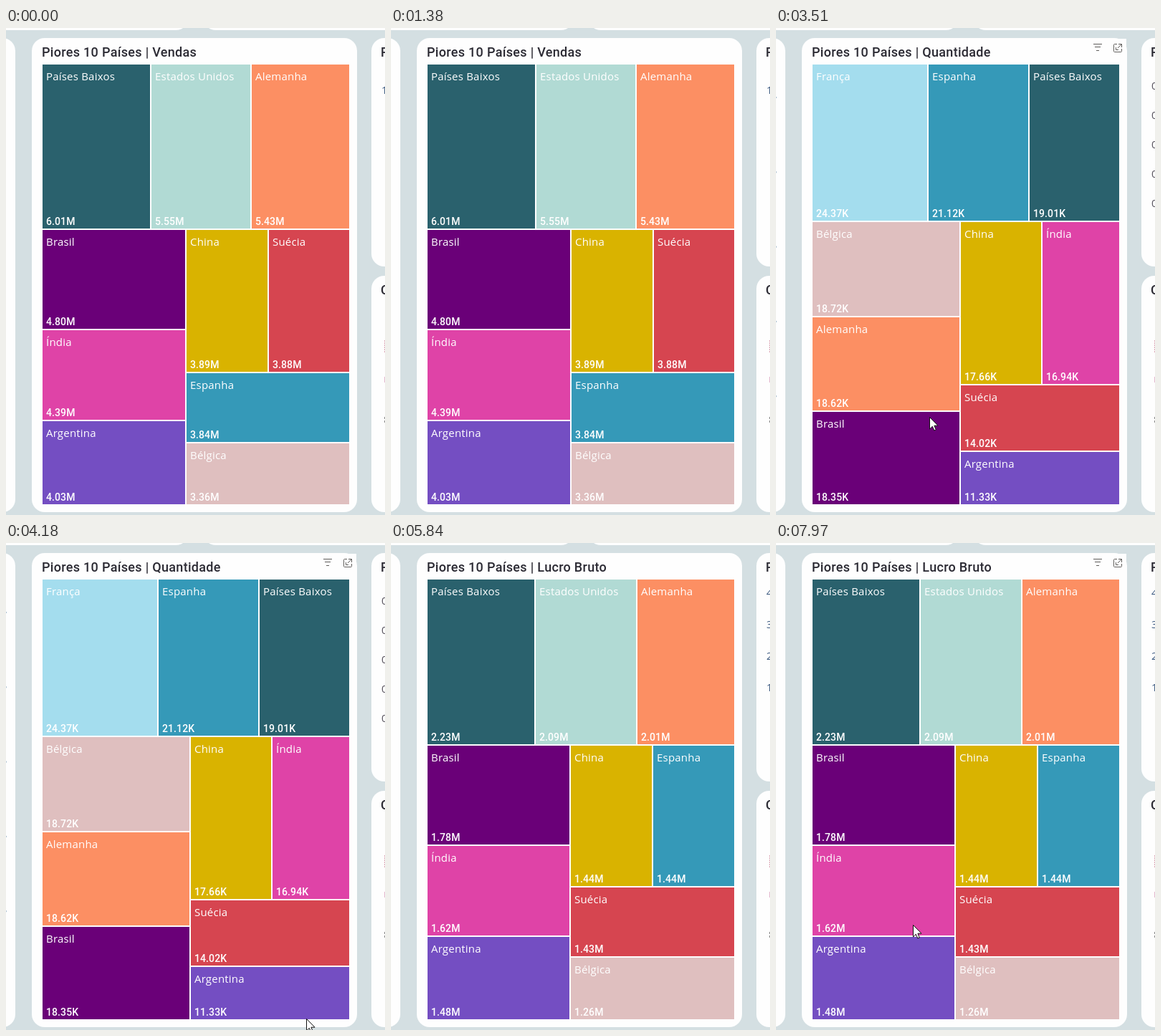
Write an HTML page that moves like this. It is 529 by 680 pixels and loops after 8 s.

```html
<!DOCTYPE html>
<html lang="pt">
<head>
<meta charset="utf-8">
<title>Piores 10 Países</title>
<style>
  html, body { margin: 0; width: 100%; height: 100%; overflow: hidden; background: #d4dfe2; }
  svg { display: block; }
  .panel { fill: #fefefe; }
  .title { font: 500 18px Roboto, sans-serif; letter-spacing: .3px; fill: #2b2a33; }
  .name { font: 15px "Open Sans", sans-serif; letter-spacing: .2px; fill: #fff; }
  .value { font: 500 14px Roboto, sans-serif; letter-spacing: .1px; fill: #fff; }
  .axis { font: 15px "Open Sans", sans-serif; }
</style>
</head>
<body>
<svg width="529" height="680" viewBox="0 0 529 680">
  <g class="panel">
    <rect x="-40" y="-40" width="295" height="43" rx="18"/>
    <rect x="275" y="-40" width="300" height="43" rx="18"/>
    <rect x="-60" y="14" width="73" height="662" rx="18"/>
    <rect x="36" y="14" width="454" height="662" rx="18"/>
    <rect x="510" y="14" width="80" height="319" rx="18"/>
    <rect x="510" y="346" width="80" height="330" rx="18"/>
  </g>
  <text class="title" x="523" y="40">P</text>
  <text class="title" x="523" y="372">C</text>
  <path d="M528.5 436v18" stroke="#dba5b5" stroke-width="1" stroke-dasharray="2 1"/>
  <path d="M528.5 487v8" stroke="#e3b9cf"/>
  <path d="M528.5 543v9" stroke="#8b8b8b" stroke-dasharray="3 2"/>
  <g id="chart"></g>
  <g id="header" fill="none" stroke="#605e5c">
    <rect x="430" y="15" width="59" height="26" fill="#fefefe" stroke="none"/>
    <path d="M443 22.5h12M445 26.5h8M447 31.5h4"/>
    <path d="M476 22.5h-3.5a1 1 0 0 0-1 1v9a1 1 0 0 0 1 1h9a1 1 0 0 0 1-1V29M478 22.5h4.5V27M482 23l-5 5M474.5 27v3.5H478"/>
  </g>
  <path id="cursor" d="M.5 .5V17L4.3 13.3 6.8 19 9.3 18 6.9 12.2H12Z" fill="#fff" stroke="#111"/>
</svg>
<script>
const LOOP = 8000, STEP = 1000 / 15;
const $ = id => document.getElementById(id);

const colors = {
  'Países Baixos': '#2a616d', 'Estados Unidos': '#b1dad4', 'Alemanha': '#fc8f63',
  'Brasil': '#6a0078', 'Índia': '#df43a7', 'Argentina': '#744ec2', 'China': '#d9b300',
  'Suécia': '#d64550', 'Espanha': '#3599b8', 'Bélgica': '#dfbfbf', 'França': '#a4ddee'
};

// cuts: two in the top row, its bottom, then the column split and the splits on each side
const views = [
  { start: 0, title: 'Vendas', unit: 'M', cuts: [202, 342, 281, 251, 421, 548, 366, 481, 579],
    names: 'Países Baixos,Estados Unidos,Alemanha,Brasil,Índia,Argentina,China,Suécia,Espanha,Bélgica',
    values: '6.01,5.55,5.43,4.80,4.39,4.03,3.89,3.88,3.84,3.36',
    axis: { labels: '1', top: 87, gap: 0, color: '#3c5a80' } },
  { start: 2840, title: 'Quantidade', unit: 'K', cuts: [212, 353, 270, 257, 403, 535, 371, 498, 591],
    names: 'França,Espanha,Países Baixos,Bélgica,Alemanha,Brasil,China,Índia,Suécia,Argentina',
    values: '24.37,21.12,19.01,18.72,18.62,18.35,17.66,16.94,14.02,11.33',
    axis: { labels: '00000', top: 81, gap: 41, color: '#5a5660' }, ticks: true },
  { start: 5840, title: 'Lucro Bruto', unit: 'M', cuts: [201, 343, 282, 250, 422, 549, 365, 480, 578],
    names: 'Países Baixos,Estados Unidos,Alemanha,Brasil,Índia,Argentina,China,Espanha,Suécia,Bélgica',
    values: '2.23,2.09,2.01,1.78,1.62,1.48,1.44,1.44,1.43,1.26',
    axis: { labels: '4321', top: 70, gap: 44, color: '#3c5a80' } }
];

// cursor visits: [time, x, y]
const visits = [
  [[445, 437, 672], [711, 187, 303], [850, 187, 303], [1370, 0, 45]],
  [[2900, 0, 60], [3040, 154, 421], [3200, 154, 421], [3500, 210, 541], [3700, 272, 568],
   [4045, 245, 676], [4178, 419, 664], [4400, 358, 580], [4650, 272, 568], [4910, 200, 556], [5170, 250, 20]],
  [[5900, 250, 30], [6110, 204, 536], [6270, 204, 536], [6570, 84, 468], [6800, 84, 468],
   [7040, 9, 520], [7240, 60, 690], [7440, 470, 690], [7640, 477, 643], [7978, 191, 533], [LOOP, 191, 533]]
];

function cells([a, b, y, m, l1, l2, r, r1, r2]) {
  const L = 50, T = 50, R = 480, B = 666;
  return [
    [L, T, a, y], [a, T, b, y], [b, T, R, y],
    [L, y, m, l1], [L, l1, m, l2], [L, l2, m, B],
    [m, y, r, r1], [r, y, R, r1], [m, r1, R, r2], [m, r2, R, B]
  ];
}

const text = (cls, x, y, s, fill) =>
  `<text class="${cls}" x="${x}" y="${y}"${fill ? ` fill="${fill}"` : ''}>${s}</text>`;

function drawChart({ title, unit, cuts, names, values, axis, ticks }) {
  const name = names.split(','), value = values.split(',');
  let out = text('title', 50, 40, 'Piores 10 Países | ' + title);
  cells(cuts).forEach(([x0, y0, x1, y1], i) => {
    out += `<rect x="${x0 + 1}" y="${y0 + 1}" width="${x1 - x0 - 2}" height="${y1 - y0 - 2}" fill="${colors[name[i]]}"/>`
      + text('name', x0 + 6, y0 + 23, name[i])
      + text('value', x0 + 6, y1 - 6, value[i] + unit);
  });
  [...axis.labels].forEach((s, i) => out += text('axis', 524, axis.top + 5 + i * axis.gap, s, axis.color));
  if (ticks) for (let i = 0; i < 5; i++)
    out += `<rect y="${96 + i * 104.3}" width="1" height="2" fill="#a9bfd0"/>`;
  $('chart').innerHTML = out;
}

function cursorAt(t) {
  const path = visits.find(v => t >= v[0][0] && t <= v[v.length - 1][0]);
  if (!path) return null;
  const i = path.findIndex((p, k) => k && t <= p[0]);
  const [t0, x0, y0] = path[i - 1], [t1, x1, y1] = path[i];
  const k = (t - t0) / (t1 - t0);
  return [x0 + (x1 - x0) * k, y0 + (y1 - y0) * k];
}

const show = (el, on) => el.setAttribute('visibility', on ? 'visible' : 'hidden');
let current;

function render(now) {
  const t = now % LOOP;
  const view = views.filter(v => t >= v.start).pop();
  if (view !== current) drawChart(current = view);

  // the pointer is sampled 15 times a second
  const pos = cursorAt(Math.floor((t - 35) / STEP) * STEP + 45);
  show($('cursor'), pos);
  show($('header'), pos && pos[0] > 36 && pos[0] < 490);
  if (pos) $('cursor').setAttribute('transform', `translate(${pos.map(Math.round)})`);
  requestAnimationFrame(render);
}
render(performance.now());
</script>
</body>
</html>
```
